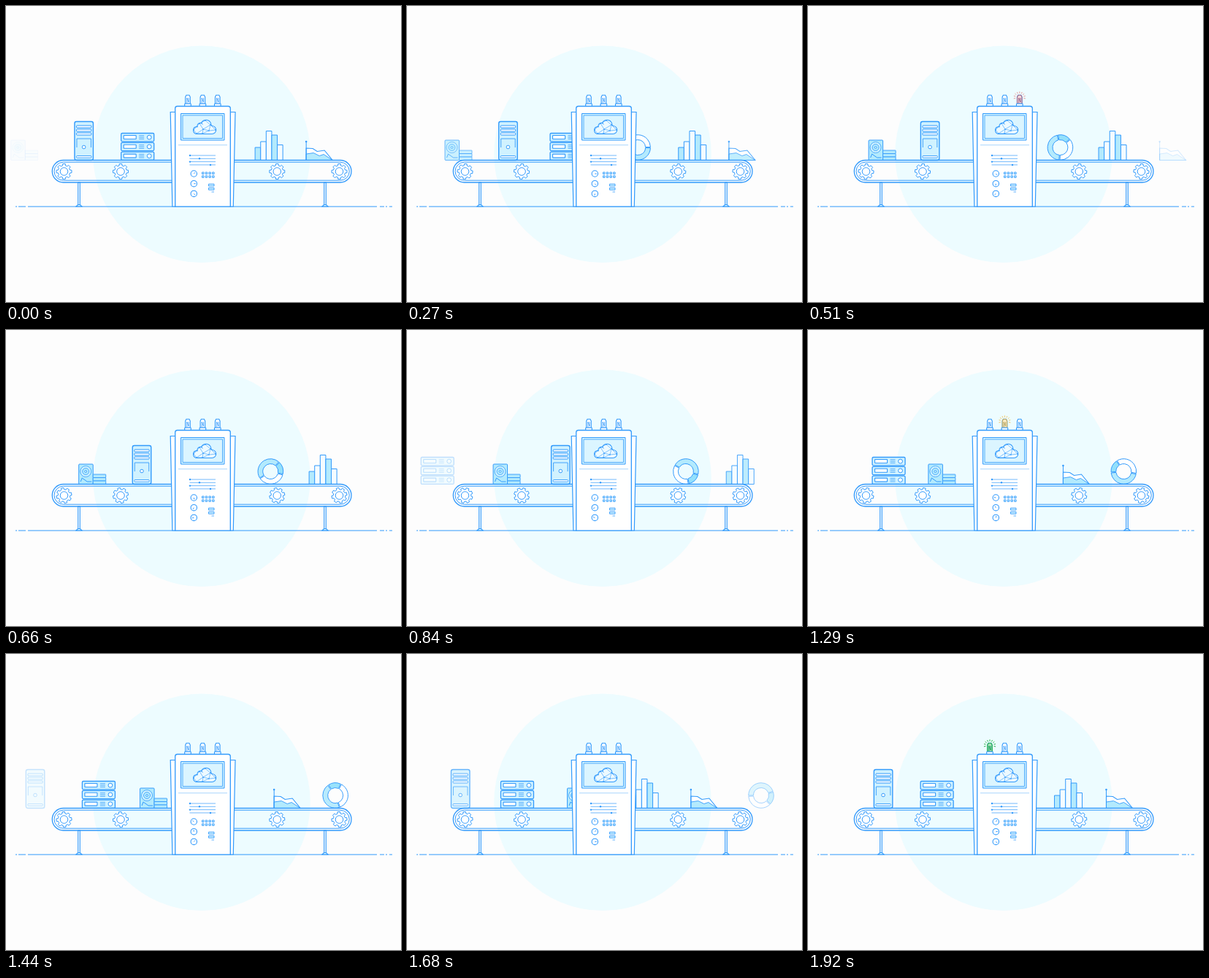
An HTML page with a canvas that plays this animation: 541 px wide and 406 px high, repeating every 1.95 s.

```html
<!DOCTYPE html>
<html>
<head>
<meta charset="utf-8">
<style>
html, body { margin: 0; width: 100%; height: 100%; overflow: hidden; background: #fdfdfd; }
canvas { display: block; }
</style>
</head>
<body>
<canvas id="stage" width="541" height="406"></canvas>
<script>
const c = document.getElementById('stage').getContext('2d');
const LOOP = 1950, STEP = 30, TAU = Math.PI * 2;
const BLUE = '#329afc', PALE = '#d0f2ff', MID = '#b3eafd', DEEP = '#93e0fb', WHITE = '#fff';

// Drawing helpers
function paint(fill, stroke = BLUE, width = 1.1) {
  if (fill) { c.fillStyle = fill; c.fill(); }
  if (stroke) { c.strokeStyle = stroke; c.lineWidth = width; c.stroke(); }
}
function box(x, y, w, h, r, ...style) {
  c.beginPath();
  c.roundRect(x, y, w, h, r);
  paint(...style);
}
function disc(x, y, r, ...style) {
  c.beginPath();
  c.arc(x, y, r, 0, TAU);
  paint(...style);
}
function path(points, closed, ...style) {
  c.beginPath();
  for (let i = 0; i < points.length; i += 2) c.lineTo(points[i], points[i + 1]);
  if (closed) c.closePath();
  paint(...style);
}
const line = (x1, y1, x2, y2, color = BLUE, width = 1) =>
  path([x1, y1, x2, y2], false, null, color, width);

// Things on the belt, drawn from their own left edge
function tower() {
  box(.5, 158.5, 25.5, 53, 2.5, PALE, BLUE, 1.4);
  for (let i = 0; i < 3; i++) box(3, 164 + i * 5, 20.5, 3, 1, WHITE, BLUE, 1);
  path([3.5, 194, 3.5, 182, 23, 182, 23, 194], false, null, BLUE, .9);
  disc(13.2, 193.5, 2.3, WHITE, BLUE, 1);
  box(3, 205.5, 20.5, 2.7, 1, WHITE, BLUE, .9);
}
function rack() {
  for (let y = 174.5; y < 202; y += 12.8) {
    box(.5, y, 45, 11.3, 1.5, PALE, BLUE, 1.3);
    box(4, y + 3, 17, 5, .5, WHITE, BLUE, 1.1);
    for (let i = 0; i < 3; i++) line(25, y + 3.3 + i * 2.3, 32, y + 3.3 + i * 2.3, BLUE, .8);
    disc(39, y + 5.6, 2.9, WHITE, BLUE, 1);
  }
}
function disk() {
  box(.5, 184, 19.5, 27.5, 1, MID, BLUE, 1);
  [7.5, 4.5, 1.5].forEach((r, i) => disc(10, 194, r, i % 2 ? MID : PALE, BLUE, .8));
  path([3, 208, 5, 203, 12, 208, 18, 208], false, null, BLUE, 1);
  for (let y = 198; y < 208; y += 4.5) box(20, y, 17.5, 4.5, .5, MID, BLUE, .9);
}
function bars() {
  [194, 186, 171.5, 177, 190.5].forEach((y, i) =>
    box(.5 + i * 7.6, y, 7.6, 211.5 - y, 0, i % 3 ? '#f4fcff' : MID, BLUE, 1));
}
function area() {
  path([0, 211.5, 0, 195, 9, 195.5, 15, 199.5, 25, 198, 36, 211.5], true, WHITE);
  path([0, 211.5, 0, 203, 10, 201.5, 18, 205.5, 24, 203.5, 36, 211.5], true, MID, BLUE, .9);
  line(0, 186, 0, 211.5);
  disc(0, 186, 1.3, BLUE, null);
}
// Rolls along the belt without slipping
function donut(x) {
  const cuts = [-95, -33, 100, 265].map(a => a / 360 * TAU + (x - 347.5) / 18);
  [DEEP, WHITE, MID].forEach((fill, i) => {
    c.beginPath();
    c.arc(0, 194, 17.3, cuts[i] + .035, cuts[i + 1] - .035);
    c.arc(0, 194, 10.5, cuts[i + 1] - .05, cuts[i] + .05, true);
    c.closePath();
    paint(fill, BLUE, 1);
  });
}

// mid: time at which the item passes x; speed in px/s; ease: how much faster it is at both ends
const items = [
  { draw: disk,  width: 38, mid: 900,  x: 123.5, speed: 99,  ease: .39 },
  { draw: rack,  width: 46, mid: 1600, x: 120,   speed: 99,  ease: .6 },
  { draw: tower, width: 26, mid: 2150, x: 117,   speed: 117, ease: .17 },
  { draw: donut, width: 0,  mid: 850,  x: 383,   speed: 108, ease: .2 },
  { draw: area,  width: 36, mid: 1750, x: 394.5, speed: 80,  ease: 1.06 },
  { draw: bars,  width: 38, mid: 2300, x: 380,   speed: 109, ease: .26 }
];

function drawItem({ draw, width, mid, x, speed, ease }, t) {
  const s = ((t - mid + 2.5 * LOOP) % LOOP - LOOP / 2) / 1000;
  const left = x + speed * (s + ease * s ** 3), center = left + width / 2;
  // Fade in at the left end of the stage and out at the right
  const alpha = Math.min(1, (center - 22) / 70, (512 - center) / 65);
  if (alpha <= 0) return;
  c.save();
  c.globalAlpha = alpha;
  c.translate(left, 0);
  draw(left);
  c.restore();
}

function gear(x, turn) {
  c.beginPath();
  for (let i = 0; i < 32; i++) {
    const a = turn + ((i >> 2) + [-.24, -.17, .17, .24][i % 4] / TAU * 8) * TAU / 8;
    const r = i % 4 % 3 ? 10.6 : 8.3;
    c.lineTo(x + r * Math.cos(a), 227 + r * Math.sin(a));
  }
  c.closePath();
  paint(WHITE, BLUE, 1);
  disc(x, 227, 5.3, WHITE, BLUE, 1);
}

function ground() {
  c.setLineDash([2, 2, 10, 3, 478, 4, 6, 2, 2, 3, 4, 99]);
  line(13, 275.1, 529, 275.1, BLUE, 1);
  c.setLineDash([]);
  for (const x of [100, 437]) {
    box(x - 1.3, 242, 2.6, 31, 0, null);
    path([x - 4, 275, x - 1.5, 272.5, x + 1.5, 272.5, x + 4, 275], true, PALE);
  }
}

function belt(t) {
  box(63.3, 211.5, 409.7, 30.5, 15.2, null, BLUE, 1.3);
  box(66, 214.2, 404.3, 25, 12.5, null, BLUE, 1);
  for (const x of [79.5, 157, 371.3, 456.5]) gear(x, t / LOOP * TAU);
}

function lampShape(x, color, fill) {
  path([x - 3.3, 134, x - 3.3, 125, x - 2, 122.3, x + 2, 122.3, x + 3.3, 125, x + 3.3, 134], true, fill, color, 1.1);
  path([x - 1.2, 133, x - 1.2, 126, x + 1.2, 132, x + 1.2, 126], false, null, color, .8);
}
// The lamps glow in turn, from right to left
function lamp(color, i, t) {
  const x = 249 + i * 20.4, phase = (t - 1920 + i * 675) / 180;
  lampShape(x, BLUE, WHITE);
  if (Math.abs(phase) < .5) {
    c.globalAlpha = Math.cos(phase * Math.PI);
    lampShape(x, color, color + '66');
    for (let ray = 0; ray < 9; ray++) {
      const a = (ray - 7.6) * .436, dx = Math.cos(a), dy = Math.sin(a);
      line(x + 5.7 * dx, 125.5 + 5.7 * dy, x + 8.2 * dx, 125.5 + 8.2 * dy, color);
    }
    c.globalAlpha = 1;
  }
  box(x - 4.3, 134, 8.6, 3.5, .5, WHITE);
}

function cloud() {
  c.beginPath();
  c.arc(261.5, 170.5, 5, TAU / 4, TAU * .72);
  c.arc(266, 164.5, 4, TAU * .45, TAU * .84);
  c.arc(274, 163, 6.8, TAU * .56, TAU);
  c.arc(282.2, 170, 5.5, -TAU / 4, TAU / 4);
  c.closePath();
  paint('#edfaff', BLUE, 1.1);
  // Mesh: join every pair of nearby nodes
  const nodes = [[257, 170], [261, 175], [265, 161], [270, 169], [273, 157], [280, 163], [278, 171], [269, 175], [287, 170]];
  nodes.forEach(([x, y], i) => {
    for (const [u, v] of nodes.slice(i + 1))
      if (Math.hypot(u - x, v - y) < 12.3) line(x, y, u, v, BLUE, .6);
    disc(x, y, .8, BLUE, null);
  });
}

function panel(t) {
  line(236, 190.7, 303, 190.7, '#a9d6fd');
  [0, 13, 0, 28].forEach((x, i) => {
    const y = 205 + i * 4.3;
    line(251.5, y, 287, y, '#62b2fc', .9);
    disc(252 + x, y, 1.2, BLUE, null);
  });
  for (let i = 0; i < 3; i++) {
    const y = 230 + i * 13.7, a = i * .8 - .8 + t / LOOP * TAU;
    disc(257.3, y, 4.2, WHITE);
    line(257.3, y, 257.3 + 2.4 * Math.cos(a), y + 2.4 * Math.sin(a));
  }
  for (let i = 0; i < 8; i++)
    box(268.5 + i % 4 * 4.7, 228 + (i >> 2) * 4.8, 2.5, 2.5, 0, PALE, BLUE, .9);
  for (let i = 0; i < 2; i++) box(277.5, 244.2 + i * 5.2, 7.5, 2.8, 0, PALE, BLUE, .9);
  line(281.5, 255, 285, 255, BLUE, .8);
}

function machine(t) {
  ['#2bb24c', '#f5b32e', '#e8413c'].forEach((color, i) => lamp(color, i, t));
  for (const side of [-1, 1]) {
    const x = d => 269.6 + side * d;
    path([x(37.5), 145.5, x(44.4), 145.5, x(41.7), 275, x(37.5), 275], true, WHITE, BLUE, 1.2);
  }
  box(231.7, 137.5, 75.6, 137.7, [3, 3, 0, 0], WHITE, BLUE, 1.3);
  box(239.5, 147.5, 59.5, 36.5, 0, PALE, BLUE, 1);
  box(242, 150, 54.5, 31.5, 0, '#dbf5ff', BLUE, .8);
  cloud();
  panel(t);
}

function frame(now) {
  const t = Math.floor(now / STEP) * STEP % LOOP;
  c.fillStyle = '#fdfdfd';
  c.fillRect(0, 0, 541, 406);
  disc(268, 203.3, 148.8, '#edfcff', null);
  ground();
  for (const item of items) drawItem(item, t);
  belt(t);
  machine(t);
}

const start = performance.now();
function tick() {
  frame(performance.now() - start);
  requestAnimationFrame(tick);
}
tick();
</script>
</body>
</html>
```
